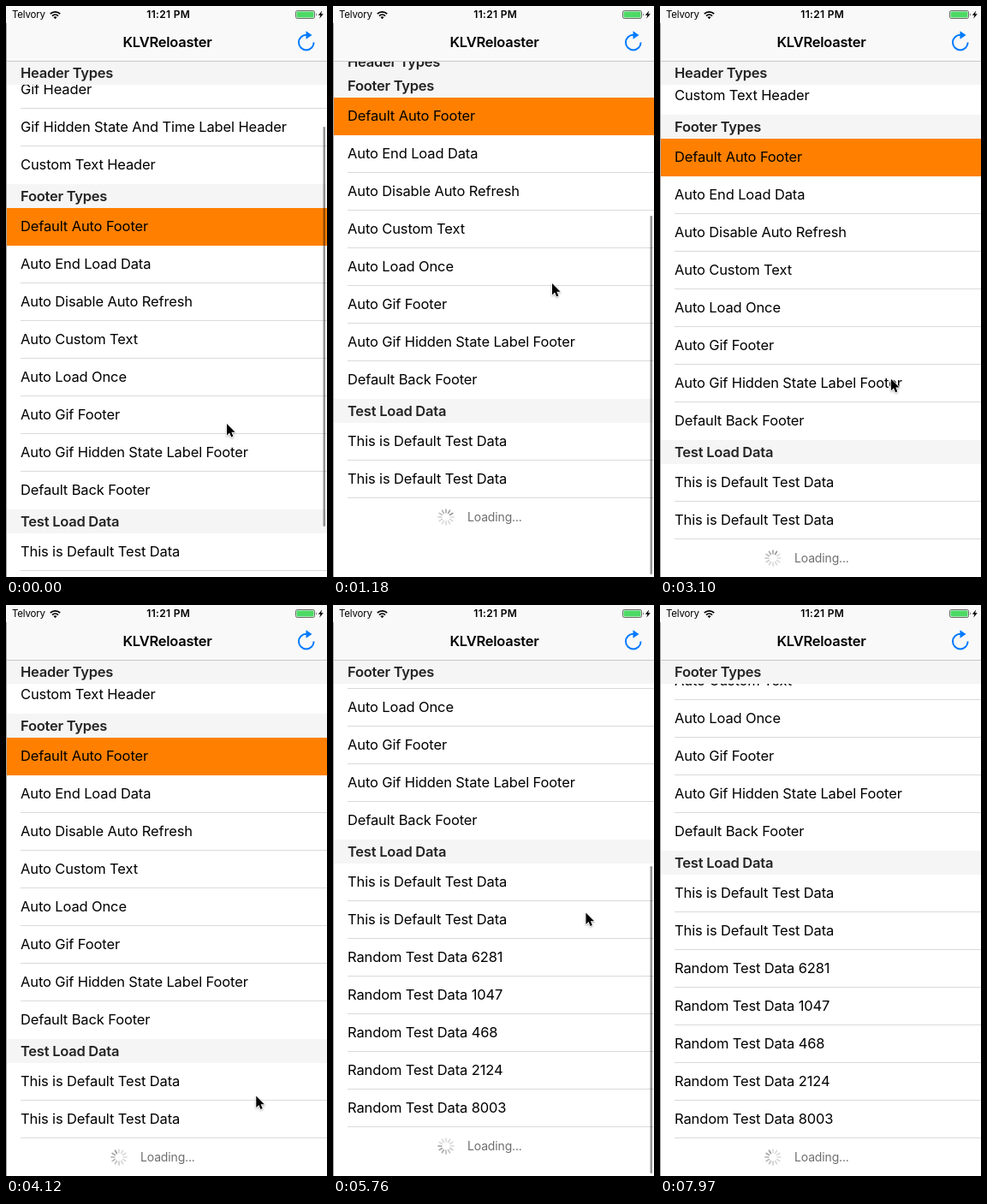
Write an HTML page that moves like this. It is 375x667 px and loops after 8000 ms.

```html
<!DOCTYPE html>
<html lang="en">
<head>
<meta charset="utf-8">
<title>Pull to load</title>
<style>
  html, body { margin: 0; width: 100%; height: 100%; overflow: hidden; background: #fff; }
  svg { display: block; width: 375px; height: 667px; font-family: Inter, Roboto, sans-serif; }
  .row { font-size: 16.5px; letter-spacing: -.13px; }
  .head { font-size: 16.5px; font-weight: 600; letter-spacing: -.25px; fill: #232323; }
  .load { font-size: 14px; letter-spacing: -.15px; fill: #6e6e6e; }
</style>
</head>
<body>
<svg viewBox="0 0 375 667">
  <rect width="375" height="667" fill="#fff"/>
  <g id="list"></g>
  <g id="bar">
    <rect width="375" height="64" fill="#f9f9f9"/>
    <rect y="64" width="375" height="1" fill="#c9c9cb"/>
    <text x="7" y="14" font-size="11.5" letter-spacing="-.2">Telvory</text>
    <g fill="none" stroke="#000" stroke-width="1.8">
      <path d="M51.8 9.2a8 8 0 0 1 11.4 0M54 11.6a5 5 0 0 1 7 0"/>
      <path d="M57.5 15.3l-2-2.2a3 3 0 0 1 4 0z" fill="#000" stroke="none"/>
    </g>
    <text x="189.7" y="14" font-size="12" font-weight="600" letter-spacing=".3" text-anchor="middle">11:21 PM</text>
    <rect x="338.5" y="5.5" width="22" height="9" rx="1.8" fill="#fff" stroke="#444" stroke-width=".8"/>
    <rect x="339.5" y="6.5" width="20" height="7" rx=".8" fill="#4cd964"/>
    <path d="M362 8.3q1.6 1.7 0 3.4z" fill="#333"/>
    <path d="M369.2 5.5l-4.4 5.2h2.6l-1.2 4 4.6-5.4h-2.7z"/>
    <text x="188.5" y="48" font-size="16.5" font-weight="600" letter-spacing="-.25" text-anchor="middle">KLVReloaster</text>
    <path d="M359.6 42.5A8.8 8.8 0 1 1 351 33.8" fill="none" stroke="#007aff" stroke-width="2"/>
    <path d="M350.5 29.2l7 4.8-7 4.8z" fill="#007aff"/>
  </g>
  <rect y="20" width="1" height="647" fill="#a6a6a6"/>
  <rect id="thumb" x="370.5" width="2.5" rx="1.25" fill="#000"/>
  <path id="cursor" d="M0 0V13.4l3.1-2.8 2.1 4.8 2.2-.9-2-4.7h4.2z"
    stroke="#fff" stroke-width="1.6" paint-order="stroke" stroke-linejoin="round"
    style="filter:drop-shadow(0 1px 1px rgba(0,0,0,.3))"/>
</svg>
<script>
const LOOP = 8000, STEP = 147.6; // the picture holds for one step
const NAV = 64, HEAD = 28, ROW = 44;
const LOADED = 29; // step at which new rows arrive
const GONE = 49;   // step at which the pointer has left

const headerRows = ['Gif Header', 'Gif Hidden State And Time Label Header', 'Custom Text Header'];
const footerRows = ['Default Auto Footer', 'Auto End Load Data', 'Auto Disable Auto Refresh', 'Auto Custom Text',
  'Auto Load Once', 'Auto Gif Footer', 'Auto Gif Hidden State Label Footer', 'Default Back Footer'];
const baseRows = Array(2).fill('This is Default Test Data');
const newRows = [6281, 1047, 468, 2124, 8003].map(n => 'Random Test Data ' + n);

const $ = id => document.getElementById(id);
const set = (id, attrs) => Object.entries(attrs).forEach(([name, v]) => $(id).setAttribute(name, v));

const ramp = (k, from, to) => Math.min(1, Math.max(0, (k - from) / (to - from)));
const smooth = (...span) => { const u = ramp(...span); return u * u * (3 - 2 * u); };
const easeOut = (...span) => Math.sin(ramp(...span) * Math.PI / 2);

// Pull past the end, bounce back; later a flick to the new end that overshoots
const scroll = k => 208 - 129 * easeOut(k, 0, 8) + 48 * smooth(k, 8.5, 14)
  - 243 * smooth(k, 35.4, 39.5) + 23 * smooth(k, 39, 43);

const cursorX = k => 258 - 2 * ramp(k, 0, 8) + 37 * smooth(k, 16, 28) + 6 * smooth(k, 32, 36)
  - 9 * smooth(k, 36, 43) + 63 * smooth(k, 43, 48);

const cursorY = k => 488 - 164 * easeOut(k, 0, 8) + 26 * smooth(k, 9, 14) + 228 * smooth(k, 16, 28)
  - 236 * smooth(k, 34, 40) + 172 * smooth(k, 39.5, 43) + 7 * smooth(k, 43, 48);

const thumbAlpha = k => 1 - ramp(k, 14, 17) + ramp(k, 34, 35) - ramp(k, 44, 47);

const text = (cls, x, y, s) => `<text class="${cls}" x="${x}" y="${y}">${s}</text>`;
const rect = (x, y, w, h, fill) => `<rect x="${x}" y="${y}" width="${w}" height="${h}" fill="${fill}"/>`;

function rows(items, top, openEnd, selected = -1) {
  return items.map((s, i) => {
    const y = top + i * ROW;
    const line = i !== selected && (openEnd || i < items.length - 1);
    return (i === selected ? rect(0, y, 375, ROW, '#ff8000') : '') +
      (line ? rect(17, y + ROW - 1, 358, 1, '#dadadc') : '') + text('row', 17, y + 27, s);
  }).join('');
}

// Section titles stick under the bar until the next one pushes them up
function head(s, top, next) {
  const y = Math.min(Math.max(top, NAV), next - HEAD);
  return rect(0, y, 375, HEAD, '#f5f5f5') + text('head', 17, y + 20, s);
}

function spinner(cx, cy, time) {
  const lead = Math.floor(time * 12 / 1000);
  let s = '';
  for (let i = 0; i < 12; i++) {
    const age = (lead - i + 120) % 12;
    s += `<path d="M0-5.2V-9" transform="translate(${cx} ${cy}) rotate(${i * 30})" stroke="#707070"
      stroke-width="1.7" stroke-linecap="round" opacity="${Math.max(.25, .7 - age * .07)}"/>`;
  }
  return s;
}

function drawThumb(k, foot, loaded) {
  const gap = foot - (loaded ? -93 : 127);
  const height = (loaded ? 372 : 467) + Math.min(0, gap);
  const bottom = 664 - Math.max(0, gap) * (loaded ? .556 : .69);
  set('thumb', { y: bottom - height, height, opacity: .42 * thumbAlpha(k) });
}

function draw(k) {
  const loaded = k >= LOADED;
  const foot = Math.round(scroll(k));
  const test = foot + HEAD + footerRows.length * ROW;
  const data = loaded ? baseRows.concat(newRows) : baseRows;
  const end = test + HEAD + data.length * ROW;

  $('list').innerHTML =
    rows(headerRows, foot - headerRows.length * ROW, false) +
    rows(footerRows, foot + HEAD, false, loaded ? -1 : 0) +
    rows(data, test + HEAD, true) +
    spinner(132, end + 22, k * STEP) + text('load', 157, end + 27, 'Loading...') +
    head('Header Types', -Infinity, foot) +
    head('Footer Types', foot, test) +
    head('Test Load Data', test, Infinity);

  drawThumb(k, foot, loaded);
  set('cursor', {
    transform: `translate(${cursorX(k)} ${cursorY(k)})`,
    visibility: k < GONE ? 'visible' : 'hidden'
  });
}

let start = null, shown = -1;
function tick(now) {
  if (start === null) start = now;
  const k = Math.floor(((now - start) % LOOP + 10) / STEP);
  if (k !== shown) draw(shown = k);
  requestAnimationFrame(tick);
}
draw(0);
requestAnimationFrame(tick);
</script>
</body>
</html>
```
